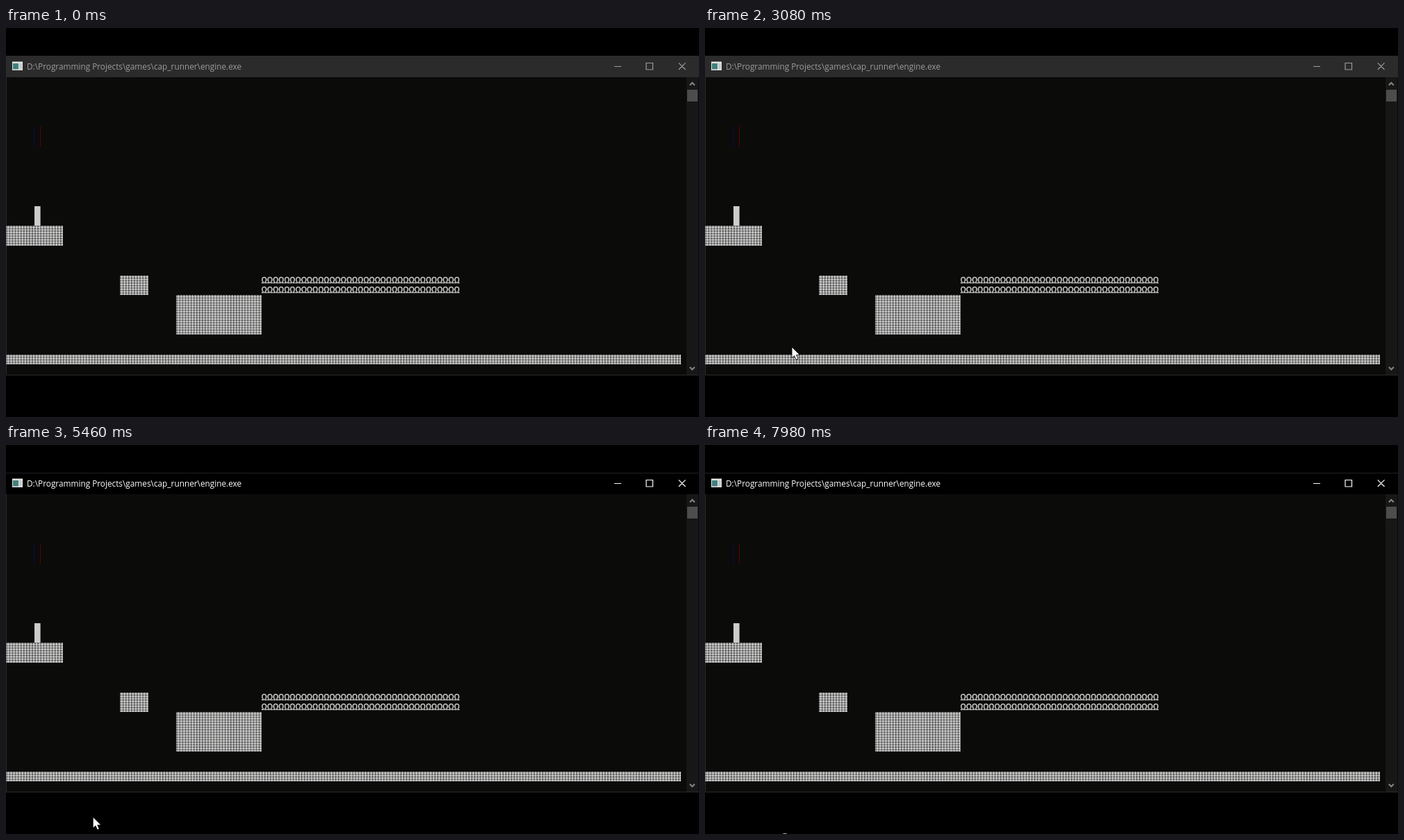
An HTML page for the animation above (8000 ms loop, 998x561 px).

```html
<!DOCTYPE html>
<html lang="en">
<head>
<meta charset="utf-8">
<title>Console platformer</title>
<style>
  html, body { margin: 0; width: 100%; height: 100%; overflow: hidden; background: #000; }
  svg { display: block; width: 100%; height: 100%; }
  .title { font: 11.8px "Open Sans", "Noto Sans", sans-serif; }
  .cells { font: 13.6px "Liberation Mono", monospace; fill: #ccc; stroke: #ccc; stroke-width: .35; }
</style>
</head>
<body>
<svg viewBox="0 0 998 561" xmlns="http://www.w3.org/2000/svg">
  <defs>
    <pattern id="weave" width="4.083" height="3.57" patternUnits="userSpaceOnUse" x=".5" y="71">
      <rect width="4.083" height="3.57" fill="#cdcdcb"/>
      <rect width="1.4" height="3.57" fill="#858588"/>
      <rect width="4.083" height="1.2" fill="#858585"/>
      <rect width="1.4" height="1.2" fill="#222"/>
    </pattern>
  </defs>
  <rect width="998" height="561" fill="#000"/>

  <rect id="bar" y="40" width="998" height="31"/>
  <path id="edge" d="M0 40.5H998" stroke="#202028"/>
  <rect y="71" width="998" height="429" fill="#0b0b0a"/>
  <path d="M.5 71V500.5H998" fill="none" stroke="#2b2b2b"/>

  <rect x="9" y="48.5" width="15" height="12.5" fill="#e4e4e4"/>
  <rect x="10" y="51" width="8" height="8.5" fill="#41807c"/>
  <rect x="19" y="51" width="4" height="8.5" fill="#c4ccd0"/>

  <g id="caption">
    <text class="title" x="30" y="60">D:\Programming Projects\games\cap_runner\engine.exe</text>
  </g>
  <path id="buttons" fill="none" stroke-width="1.2" d="M876 55.5H886M922 50.5H931.5V60H922ZM968.8 50.3L978.5 60M978.5 50.3L968.8 60"/>

  <rect x="980" y="71" width="17" height="429" fill="#171717"/>
  <rect x="981" y="89" width="15" height="17" fill="#4d4d4d"/>
  <path d="M984.8 82.5L988.3 79L991.8 82.5M984.8 489L988.3 492.5L991.8 489" fill="none" stroke="#858585" stroke-width="2"/>

  <path d="M40.5 141V171" stroke="#0c0c44"/>
  <path d="M49.5 142V171" stroke="#600000"/>
  <g id="level"></g>

  <rect id="tip" x="112.5" y="560" width="5" height="1" fill="#b0b0b0"/>
  <path id="cursor" d="M0 0V16L3.7 12.6L6.3 18.4L9 17.2L6.5 11.6H11.5Z" fill="#fff" stroke="#000" stroke-width=".8"/>
</svg>
<script>
const LOOP = 8000, FOCUS_AT = 4460;
const CELL_W = 8.165, CELL_H = 14.28, LEFT = .4, TOP = 71;
const $ = id => document.getElementById(id);
const colX = col => Math.round(LEFT + col * CELL_W);
const rowY = row => Math.round(TOP + row * CELL_H);

function add(tag, attrs, text = "") {
  const el = document.createElementNS("http://www.w3.org/2000/svg", tag);
  for (const key in attrs) el.setAttribute(key, attrs[key]);
  el.textContent = text;
  $("level").append(el);
}

function block(col, row, cols, rows, fill = "url(#weave)") {
  const x = colX(col), y = rowY(row);
  add("rect", { x, y, width: colX(col + cols) - x, height: rowY(row + rows) - y, fill });
}

block(0, 15, 10, 2);
block(20, 20, 5, 2);
block(30, 22, 15, 4);
block(0, 28, 119, 1);
add("rect", { x: 41, y: rowY(13), width: 8.6, height: rowY(15) - rowY(13), fill: "#ccc" });
for (const row of [20, 21])
  add("text", { class: "cells", x: LEFT + 45 * CELL_W, y: rowY(row) + 11 }, "Ω".repeat(35));

// Mouse path: time, x, y
const path = [
  [1900, -14, 440], [2300, 117, 458], [2900, 117, 458], [3500, 154, 467],
  [3820, 154, 467], [4060, 147, 482.5], [5150, 147, 482.5], [5650, 115, 562]
];

function mouseAt(t) {
  const i = path.findIndex(p => p[0] > t);
  if (i < 1) return null;
  const [t0, x0, y0] = path[i - 1], [t1, x1, y1] = path[i];
  const u = (t - t0) / (t1 - t0), k = u * u * (3 - 2 * u);
  return [x0 + (x1 - x0) * k, y0 + (y1 - y0) * k];
}

function draw(t) {
  const active = t >= FOCUS_AT;
  const ink = active ? "#fff" : "#9c9c9c";
  $("bar").setAttribute("fill", active ? "#000" : "#2b2b2b");
  $("edge").style.display = active ? "" : "none";
  $("caption").setAttribute("fill", ink);
  $("buttons").setAttribute("stroke", ink);

  const mouse = mouseAt(t);
  $("cursor").style.display = mouse ? "" : "none";
  if (mouse) $("cursor").setAttribute("transform", `translate(${mouse})`);
  $("tip").style.display = t >= path.at(-1)[0] ? "" : "none";
}

const start = performance.now();
function tick() {
  draw((performance.now() - start) % LOOP);
  requestAnimationFrame(tick);
}
tick();
</script>
</body>
</html>
```
